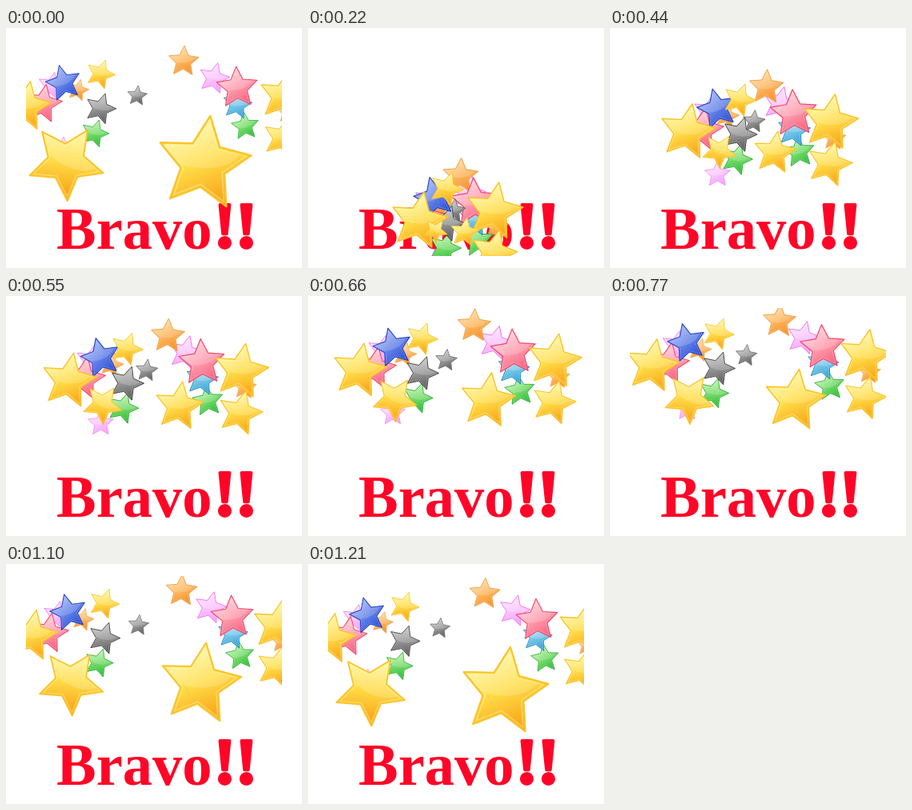
Recreate the animation shown at these times as an HTML page. Size 370x300 px, loop 1320 ms.

```html
<!DOCTYPE html>
<html lang="en">
<head>
<meta charset="utf-8">
<title>Bravo</title>
<style>
html, body { margin: 0; width: 100%; height: 100%; overflow: hidden; background: #fff; }
svg { display: block; width: 100vw; height: 100vh; }
text { font-family: "Liberation Serif", "Times New Roman", serif; font-weight: bold; fill: #ff0528; }
</style>
</head>
<body>
<svg viewBox="0 0 370 300">
  <defs><clipPath id="frame"><rect x="25" y="15" width="320" height="270"/></clipPath></defs>
  <text x="63" y="276" font-size="74.5">Bravo</text>
  <text x="260" y="274" font-size="81" stroke="#ff0528" stroke-width="4" stroke-linejoin="round">!!</text>
  <g id="stars" clip-path="url(#frame)"></g>
</svg>
<script>
const STEP = 110, STEPS = 12;
const CENTER = 185;

// light, middle, deep, outline
const palette = {
  gold: ['#fff9ae', '#ffdc48', '#f8a416', '#fbc42a'],
  orange: ['#ffdcA0', '#fcb45c', '#f7902c', '#f09a3a'],
  violet: ['#fde4ff', '#fac4fd', '#f4a0fa', '#f06cf0'],
  pink: ['#ffd2da', '#fd9aac', '#f7627e', '#f8446a'],
  green: ['#c4f5ae', '#78dc6c', '#30bc38', '#22a632'],
  sky: ['#c4ebfa', '#7cc8ea', '#38a4d6', '#1685ba'],
  blue: ['#a0b4f6', '#6482e8', '#2f52d6', '#1d3cc4'],
  grey: ['#cacaca', '#969696', '#606060', '#444444']
};

// Where each star ends, back to front: x, y, radius, angle
const ends = {
  violet: [[57, 72, 18, 12], [72, 150, 15, 0], [260, 62, 20, 14]],
  orange: [[352, 105, 14, 4], [90, 77, 14, 14], [222, 41, 20, 3]],
  green: [[111, 131, 18, 18], [299, 122, 18, -6]],
  sky: [[289, 95, 19, 10]],
  pink: [[46, 94, 25, 10], [289, 74, 27, -3]],
  grey: [[164, 84, 13, 6], [118, 100, 20, 18]],
  blue: [[72, 68, 23, -14]],
  gold: [[25, 97, 32, 10], [347, 85, 32, 10], [346, 137, 26, 15],
    [118, 57, 19, 20], [75, 167, 49, 34], [247, 169, 61, 8]]
};

const mix = (a, b, p) => a + (b - a) * p;
const easeOut = q => (1 - Math.exp(-2 * q)) / (1 - Math.exp(-2));

// q is below 0 while the burst rises, then runs from 0 to 1 as the stars drift apart.
function pose([x, y, r], q) {
  const dx = x - CENTER, near = r > 40, left = 1 - q;
  const spread = dx * (0.2 + 0.0022 * Math.abs(dx));
  const rise = 78 * Math.exp(-3.77 * q) - 45 + 44 * q;
  return {
    x: CENTER + (q < 0 ? spread * (1 + 1.9 * q) : mix(spread, dx, easeOut(q))),
    y: y + rise - (near ? 46 * left : 0),
    r: r * (near ? 1 - 0.55 * left : 1 + 0.13 * left)
  };
}

function starPath(r) {
  let d = '';
  for (let i = 0; i < 10; i++) {
    const a = i * Math.PI / 5, q = i % 2 ? r * 0.48 : r;
    d += (i ? 'L' : 'M') + (q * Math.sin(a)).toFixed(2) + ' ' + (-q * Math.cos(a)).toFixed(2);
  }
  return d + 'Z';
}

function add(parent, tag, attrs) {
  const el = document.createElementNS('http://www.w3.org/2000/svg', tag);
  for (const k in attrs) el.setAttribute(k, attrs[k]);
  parent.appendChild(el);
  return el;
}

const defs = document.querySelector('defs');
const layer = document.getElementById('stars');
add(add(defs, 'clipPath', { id: 'body' }), 'path', { d: starPath(88) });

for (const [name, shades] of Object.entries(palette)) {
  const g = add(defs, 'linearGradient', { id: name, x1: 0.25, y1: 0.1, x2: 0.75, y2: 0.95 });
  shades.slice(0, 3).forEach((shade, i) => add(g, 'stop', { offset: i / 2, 'stop-color': shade }));
}

function makeStar(color, end) {
  const [light, , , line] = palette[color];
  const el = add(layer, 'g', {});
  add(el, 'path', { d: starPath(99), fill: `url(#${color})`, stroke: line, 'stroke-width': 4, 'stroke-linejoin': 'round' });
  add(el, 'path', { d: starPath(88), fill: 'none', stroke: light, 'stroke-width': 3, opacity: 0.4 });
  add(el, 'ellipse', { cx: -18, cy: -42, rx: 92, ry: 52, fill: '#fff', opacity: 0.18, 'clip-path': 'url(#body)' });
  return { el, end };
}

const stars = Object.entries(ends).flatMap(([color, list]) => list.map(end => makeStar(color, end)));

function draw(time) {
  const step = Math.floor(time / STEP) % STEPS || STEPS;
  const q = (step - 4) / 8;
  for (const { el, end } of stars) {
    const { x, y, r } = pose(end, q);
    el.setAttribute('transform', `translate(${x} ${y}) rotate(${end[3]}) scale(${r / 100})`);
  }
}

const start = performance.now();
function tick() {
  draw(performance.now() - start);
  requestAnimationFrame(tick);
}
tick();
</script>
</body>
</html>
```
